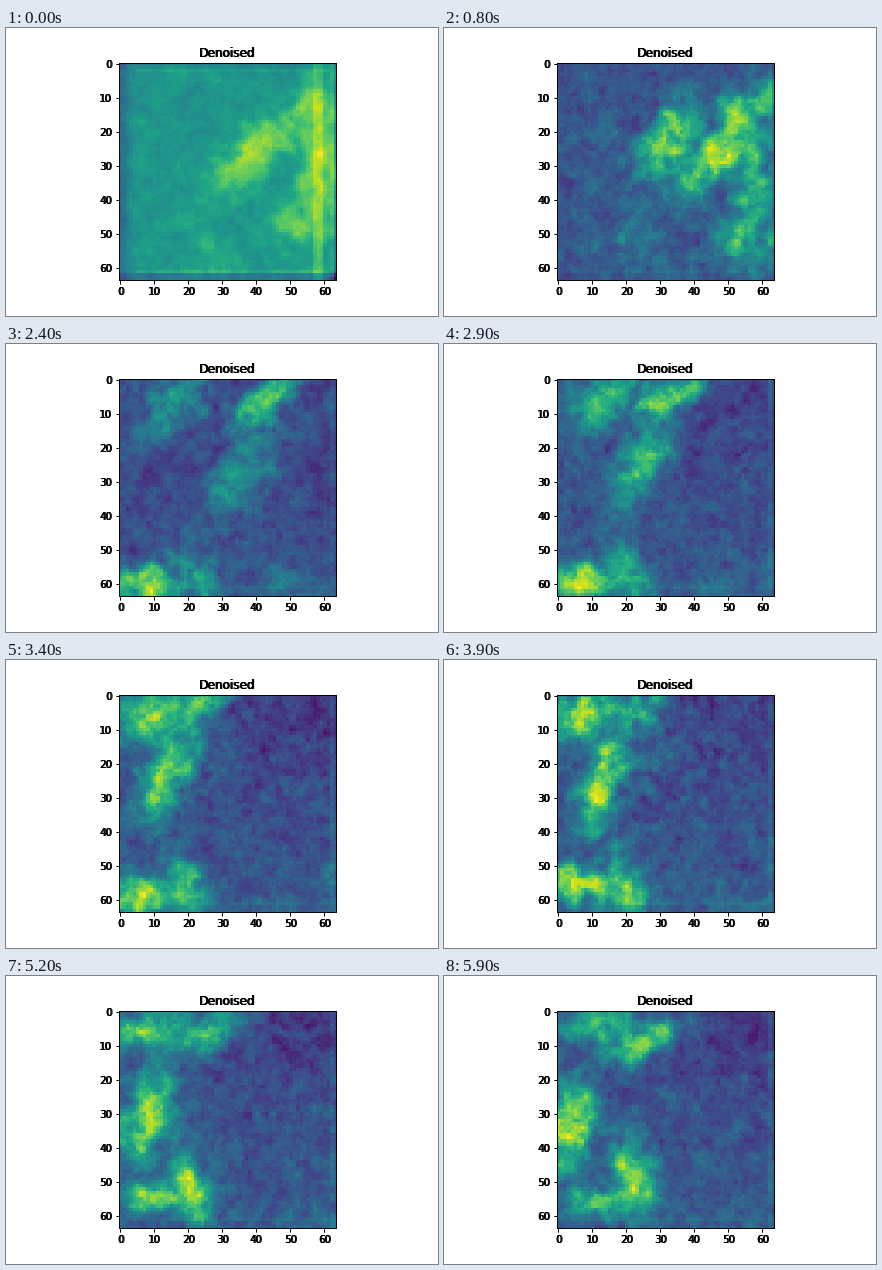
A matplotlib script that plays this animation: 432x288 px, repeating every 6000 ms.

```python
import numpy as np
import matplotlib.pyplot as plt
from matplotlib.animation import FuncAnimation

N = 64
FRAMES = 60
INTERVAL = 100
TEXTURE_STEP = 8  # frames between two states of the slow texture

plt.rcParams["font.family"] = "DejaVu Sans"
Y, X = np.mgrid[0:N, 0:N].astype(float)


class Arm:
    """Bright band that follows waypoints (frame, x, y, strength)."""

    def __init__(self, path, size, tilt):
        self.path = np.array(path, float).T
        self.size = size
        self.tilt = np.radians(tilt)

    def glow(self, frame, x, y):
        times, *tracks = self.path
        cx, cy, strength = (np.interp(frame, times, t) for t in tracks)
        tilt = np.interp(frame, [0, FRAMES - 1], self.tilt)
        dx, dy = x - cx, y - cy
        along = (dx * np.cos(tilt) + dy * np.sin(tilt)) / self.size[0]
        across = (dy * np.cos(tilt) - dx * np.sin(tilt)) / self.size[1]
        return strength * np.exp(-(along ** 2 + across ** 2) ** 1.2)


ARMS = [
    # main front
    Arm([(0, 41, 25, .33), (8, 44, 28, .55), (17, 39, 27, .42), (24, 35, 27, .28),
         (34, 14, 23, .48), (44, 13, 28, .55), (59, 4, 33, .55)], (14, 6.5), (-42, -82)),
    # upper crest
    Arm([(0, 56, 12, .27), (8, 54, 15, .55), (17, 50, 3, .66), (24, 43, 6, .6),
         (34, 22, 4, .45), (44, 25, 4, .3), (59, 24, 9, .5)], (12, 5), (-45, -25)),
    # side lobe
    Arm([(0, 32, 32, .2), (8, 32, 23, .52), (17, 31, 28, .42), (24, 16, 6, .32),
         (34, 9, 6, .5), (44, 4, 7, .5), (59, 13, 4, .4)], (12, 6), (-60, 0)),
    # right-hand column
    Arm([(0, 58, 30, .28), (8, 57, 34, .36), (17, 54, 14, .3), (22, 52, 8, 0)],
        (26, 6), (90, 90)),
    # lower right
    Arm([(0, 52, 47, .25), (8, 54, 51, .33), (24, 49, 62, .15), (32, 46, 63, 0)],
        (9, 6), (0, 0)),
    # bottom left
    Arm([(11, 10, 63, 0), (17, 12, 61, .27), (24, 7, 60, .6), (34, 5, 59, .5),
         (44, 8, 52, .58), (59, 13, 56, .45)], (11, 5), (0, 0)),
    # its trailing lobe
    Arm([(14, 26, 54, .1), (24, 21, 58, .28), (34, 19, 57, .38), (44, 19, 56, .46),
         (59, 22, 48, .52)], (11, 5.5), (40, 80)),
]


def border():
    """Dark rim and bright inner lines of the opening picture."""
    rim = -.17 * np.exp(-(X / 2.5) ** 2) - .1 * np.exp(-Y)
    rim -= .12 * (Y > 61) + .12 * (X > 62)
    rim -= .4 * np.exp(-(2 * N - 2 - X - Y) / 2)
    inside = (X > 4) & (X < 62)
    lines = inside * (.06 * (Y == 61) + .05 * (Y == 2))
    return rim + lines + .1 * ((X > 56) & (X < 60))


def blur(a, passes=1):
    for _ in range(passes):
        for axis in (0, 1):
            a = (np.roll(a, 1, axis) + 2 * a + np.roll(a, -1, axis)) / 4
    return a


def clouds(seed, passes):
    a = blur(np.random.default_rng(seed).normal(size=(N, N)), passes)
    return a / a.std()


def slow_clouds(seed, frame):
    step, rest = divmod(frame, TEXTURE_STEP)
    mix = rest / TEXTURE_STEP
    return (1 - mix) * clouds(seed + step, 4) + mix * clouds(seed + step + 1, 4)


def grain(frame):
    rng = np.random.default_rng(frame)
    fine = rng.normal(size=(N, N))
    block = np.kron(rng.normal(size=(N // 2, N // 2)), np.ones((2, 2)))
    return .4 * fine + .5 * clouds(1000 + frame, 1) + .4 * block


def field_at(frame):
    x = X + 1.3 * slow_clouds(200, frame)
    y = Y + 1.3 * slow_clouds(300, frame)
    glow = np.cbrt(sum(arm.glow(frame, x, y) ** 3 for arm in ARMS))

    opening = np.exp(-frame / 3)
    late = np.clip((frame - 17) / 17, 0, 1)
    field = .25 + glow + opening * (.29 + border())
    field += late * (.14 * Y / N - .1) * X / N
    field += .04 * ((Y == 61) & (X > 3) & (X < 61)) + .05 * (X == 62)

    rough = (.042 + .06 * glow) * (1 - .45 * opening)
    field += rough * (grain(frame) + .7 * slow_clouds(400, frame))
    return np.clip(field / field.max(), 0, 1)


def add_axes(shift=0):
    """Labelled axes; a shifted copy carries only its text."""
    ax = fig.add_subplot()
    ax.set(xlim=(-.5, N - .5), ylim=(N - .5, -.5), aspect="equal", title="Denoised")
    ax.set_xticks(range(0, N, 10))
    ax.set_yticks(range(0, N, 10))
    ax.patch.set_visible(False)
    if shift:
        box = ax.get_position(original=True)
        ax.set_position(box.translated(shift / 432, 0))
        ax.spines[:].set_visible(False)
        ax.tick_params(color="none")
    return ax


fig = plt.figure(figsize=(6, 4), dpi=72, facecolor="white")
fig.subplots_adjust(left=.125, right=.9, bottom=.125, top=.88)
image = add_axes().imshow(field_at(0), cmap="viridis", vmin=0, vmax=1)

# Overlaid copies give the heavy, slightly doubled lettering.
add_axes()
add_axes(shift=1)


def draw(frame):
    image.set_data(field_at(frame))
    return [image]


anim = FuncAnimation(fig, draw, frames=FRAMES, interval=INTERVAL, repeat=True)
plt.show()
```
